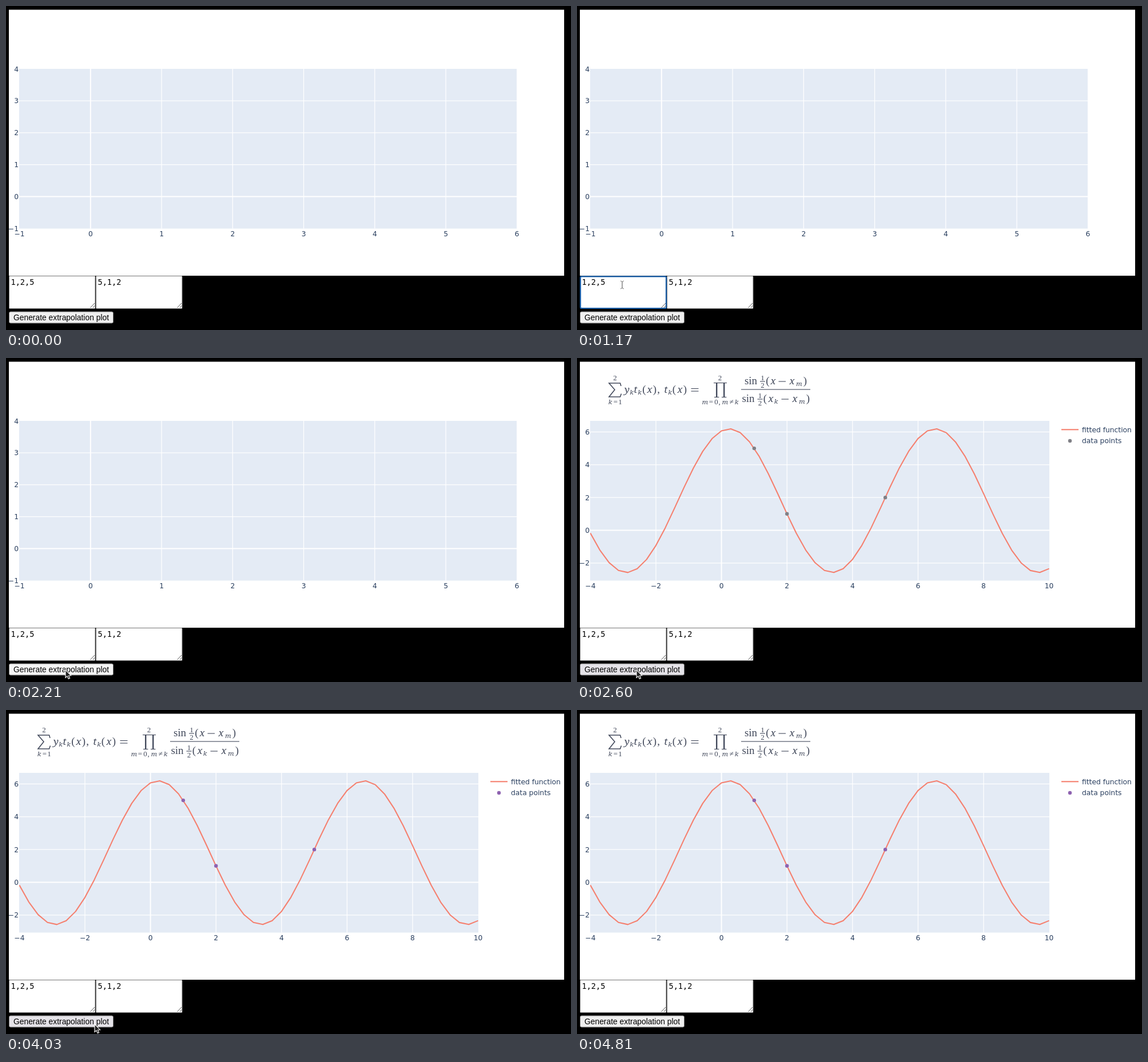
Write an HTML page with a canvas that moves like this. It is 988 by 567 pixels and loops after 8000 ms.

```html
<!DOCTYPE html>
<html lang="en">
<head>
<meta charset="utf-8">
<title>Extrapolation plot</title>
<style>
  html, body { margin: 0; width: 100%; height: 100%; overflow: hidden; background: #000; }
  canvas { display: block; }
</style>
</head>
<body>
<canvas id="stage" width="988" height="567"></canvas>
<script>
const ctx = document.getElementById('stage').getContext('2d');
const LOOP = 8000;
const INK = '#2a3f5f', MATH = '#434a5c', CURVE = '#f5806f';
const SANS = '12.3px "DejaVu Sans", sans-serif';
const DATA = [[1, 5], [2, 1], [5, 2]];

// Pointer steps: start time, x, y, shape
const POINTER = [
  [0], [390, 104, 503, 'beam'], [520, 82, 490, 'beam'], [650, 79, 488, 'beam'],
  [1690, 78, 490, 'beam'], [1820, 84, 508, 'beam'], [1950, 104, 546, 'arrow'],
  [3250, 118, 548, 'arrow'], [3380, 136, 550, 'arrow'], [3770, 145, 550, 'arrow'],
  [3900, 151, 550, 'arrow'], [4030, 155, 550, 'arrow'], [4160, 164, 551, 'arrow'],
  [4290, 180, 554, 'arrow'], [4420, 200, 560, 'arrow'], [4550]
];

function rect(x, y, w, h, color) {
  ctx.fillStyle = color;
  ctx.fillRect(x, y, w, h);
}

function text(str, x, y, font, color = INK, align = 'left') {
  ctx.font = font;
  ctx.fillStyle = color;
  ctx.textAlign = align;
  ctx.fillText(str, x, y);
}

function path(points, color, width = 1) {
  ctx.beginPath();
  points.forEach(([x, y]) => ctx.lineTo(x, y));
  ctx.strokeStyle = color;
  ctx.lineWidth = width;
  ctx.stroke();
}

function box(x, y, w, h, fill, border, width, radius) {
  ctx.beginPath();
  ctx.roundRect(x, y, w, h, radius);
  ctx.fillStyle = fill;
  ctx.fill();
  ctx.strokeStyle = border;
  ctx.lineWidth = width;
  ctx.stroke();
}

function dot(x, y, color) {
  ctx.beginPath();
  ctx.arc(x, y, 3.2, 0, 7);
  ctx.fillStyle = color;
  ctx.fill();
}

// Axes: x0/y0 are the zero positions, ux/uy the pixels per unit
function axes({ x0, ux, y0, uy, xs, ys, right, step }) {
  rect(23, 110, right - 23, 279.5, '#e4ebf5');
  for (let v = xs[0]; v <= xs[1]; v += step) {
    const x = x0 + v * ux, w = v ? 1.2 : 2;
    if (x > 25 && x < right - 2) rect(x - w / 2, 110, w, 279.5, '#fff');
    text(String(v).replace('-', '−'), x, 403, SANS, INK, 'center');
  }
  for (let v = ys[0]; v <= ys[1]; v += step) {
    const y = y0 - v * uy, w = v ? 1.2 : 2;
    if (y > 112 && y < 387) rect(23, y - w / 2, right - 23, w, '#fff');
    text(String(v).replace('-', '−'), 22, y + 4.5, SANS, INK, 'right');
  }
}

const EMPTY = { x0: 147.8, ux: 124.25, y0: 333.5, uy: 55.85, xs: [-1, 6], ys: [-1, 4], right: 893, step: 1 };
const FITTED = { x0: 252.6, ux: 57.3, y0: 301.5, uy: 28.68, xs: [-4, 10], ys: [-2, 6], right: 826, step: 2 };

const fit = x => DATA.reduce((sum, [xk, yk]) => sum + DATA.reduce((p, [xm]) =>
  xm === xk ? p : p * Math.sin((x - xm) / 2) / Math.sin((xk - xm) / 2), yk), 0);

function fittedPlot(dotColor) {
  const at = (x, y) => [FITTED.x0 + x * FITTED.ux, FITTED.y0 - y * FITTED.uy];
  axes(FITTED);
  ctx.save();
  ctx.beginPath();
  ctx.rect(23, 110, 803, 280);
  ctx.clip();
  ctx.lineJoin = 'round';
  path(Array.from({ length: 50 }, (_, i) => {
    const x = -4 + 14 * i / 49;
    return at(x, fit(x));
  }), CURVE, 2.1);
  ctx.restore();
  DATA.forEach(([x, y]) => dot(...at(x, y), dotColor));

  path([[847, 125.3], [877, 125.3]], CURVE, 2.1);
  text('fitted function', 883, 129.5, SANS);
  dot(862, 145, dotColor);
  text('data points', 883, 149.3, SANS);
  formula();
}

// Space-separated glyphs, each centred on its own x
function glyphs(font, y, str, ...xs) {
  str.split(' ').forEach((s, i) => text(s, xs[i], y, font, MATH, 'center'));
}

function formula() {
  const italic = 'italic 17px "Noto Serif", serif';
  const sub = 'italic 11.5px "Noto Serif", serif';
  const roman = '19px "Liberation Serif", serif';
  const small = '13px "Liberation Serif", serif';
  const bar = (x, y, w) => rect(x, y, w, 1.1, MATH);

  path([[77, 49], [75.5, 44], [56, 44], [66, 55.5], [56, 68], [75.5, 68], [77.5, 62.5]], MATH, 1.6);
  bar(239, 43, 23);
  for (const x of [243, 256]) {
    rect(x, 43, 2.4, 26, MATH);
    bar(x - 3, 68, 8.4);
  }
  glyphs(small, 39, '2 2', 66.5, 250);
  glyphs(small, 81, '= 1', 67.5, 75.5);
  glyphs(sub, 81, 'k', 58);
  glyphs(sub, 81, 'm m k', 224, 259, 279);
  glyphs(small, 81, '= 0 , ≠', 234.5, 243.5, 249, 270);

  glyphs(italic, 61, 'y t x t x', 87.5, 102.5, 127, 155.5, 180);
  glyphs(sub, 64, 'k k k', 95.5, 109.5, 162.5);
  glyphs(roman, 61, '( ) , ( )', 117.5, 136, 142.5, 170, 189);
  bar(199.5, 53, 13);
  bar(199.5, 57.5, 13);

  bar(287, 54.5, 121);
  glyphs(roman, 46, 'sin ( )', 304, 333.5, 399);
  glyphs(italic, 46, 'x x', 343, 376);
  glyphs(sub, 49, 'm', 388.5);
  bar(352.5, 40.5, 12.5);
  glyphs(roman, 77, 'sin ( )', 299.5, 329, 404);
  glyphs(italic, 77, 'x x', 339, 381);
  glyphs(sub, 80, 'k m', 348, 393.5);
  bar(357.5, 71.5, 12.5);
  for (const [x, y] of [[324.5, 40.5], [320, 71.5]]) {
    bar(x - 4.5, y, 9);
    glyphs(small, y - 2, '1', x);
    glyphs(small, y + 11, '2', x);
  }
}

function textarea(x, value, focused, caret) {
  if (focused) box(x + 1, 473.3, 150, 55.7, '#fff', '#1c62ad', 2.2, 2);
  else box(x + .5, 472.5, 150.5, 57, '#fff', '#767676', 1, 1);
  text(value, x + 3.5, 488, '13.6px "DejaVu Sans Mono", monospace', '#000');
  path([[x + 142.5, 528], [x + 150, 520]], '#555');
  path([[x + 147, 528], [x + 150, 524.5]], '#555');
  if (caret) rect(x + 44.5, 476, 1.2, 15, '#000');
}

function pointer(x, y, shape) {
  if (shape === 'beam') {
    path([[x, y - 6], [x, y + 6]], '#555', 1.1);
    for (const [end, inner] of [[-7, -5.5], [7, 5.5]])
      path([[x - 3, y + end], [x, y + inner], [x + 3, y + end]], '#777');
    return;
  }
  ctx.save();
  ctx.translate(x, y);
  ctx.beginPath();
  [[0, 0], [0, 13.5], [3, 10.8], [5.2, 15.6], [7.6, 14.5], [5.5, 9.9], [9.6, 9.7]]
    .forEach(p => ctx.lineTo(...p));
  ctx.closePath();
  ctx.fillStyle = '#222';
  ctx.fill();
  ctx.strokeStyle = '#fff';
  ctx.lineWidth = 1.1;
  ctx.stroke();
  ctx.restore();
}

function draw(t) {
  const [, px, py, shape] = POINTER.findLast(step => t >= step[0]);
  const within = (from, to) => t >= from && t < to;
  const hovering = shape === 'arrow' && px < 188;

  rect(0, 0, 988, 567, '#000');
  rect(5, 6.5, 971, 465.5, '#fff');
  if (t < 2470) axes(EMPTY);
  else fittedPlot(t < 3250 ? '#808086' : '#8e62b0');

  textarea(157, '5,1,2', false, false);
  textarea(5, '1,2,5', within(650, 2210), within(650, 1170) || within(1690, 2210));

  const face = within(2210, 2340) ? '#f5f5f5' : hovering ? '#e5e3e8' : '#efefef';
  box(5.5, 535, 182, 20, face, '#767676', 1, 2.5);
  text('Generate extrapolation plot', 13, 550, '13.85px "Liberation Sans", Arial, sans-serif', '#000');
  if (shape) pointer(px, py, shape);
}

function tick() {
  draw(performance.now() % LOOP);
  requestAnimationFrame(tick);
}
tick();
</script>
</body>
</html>
```
